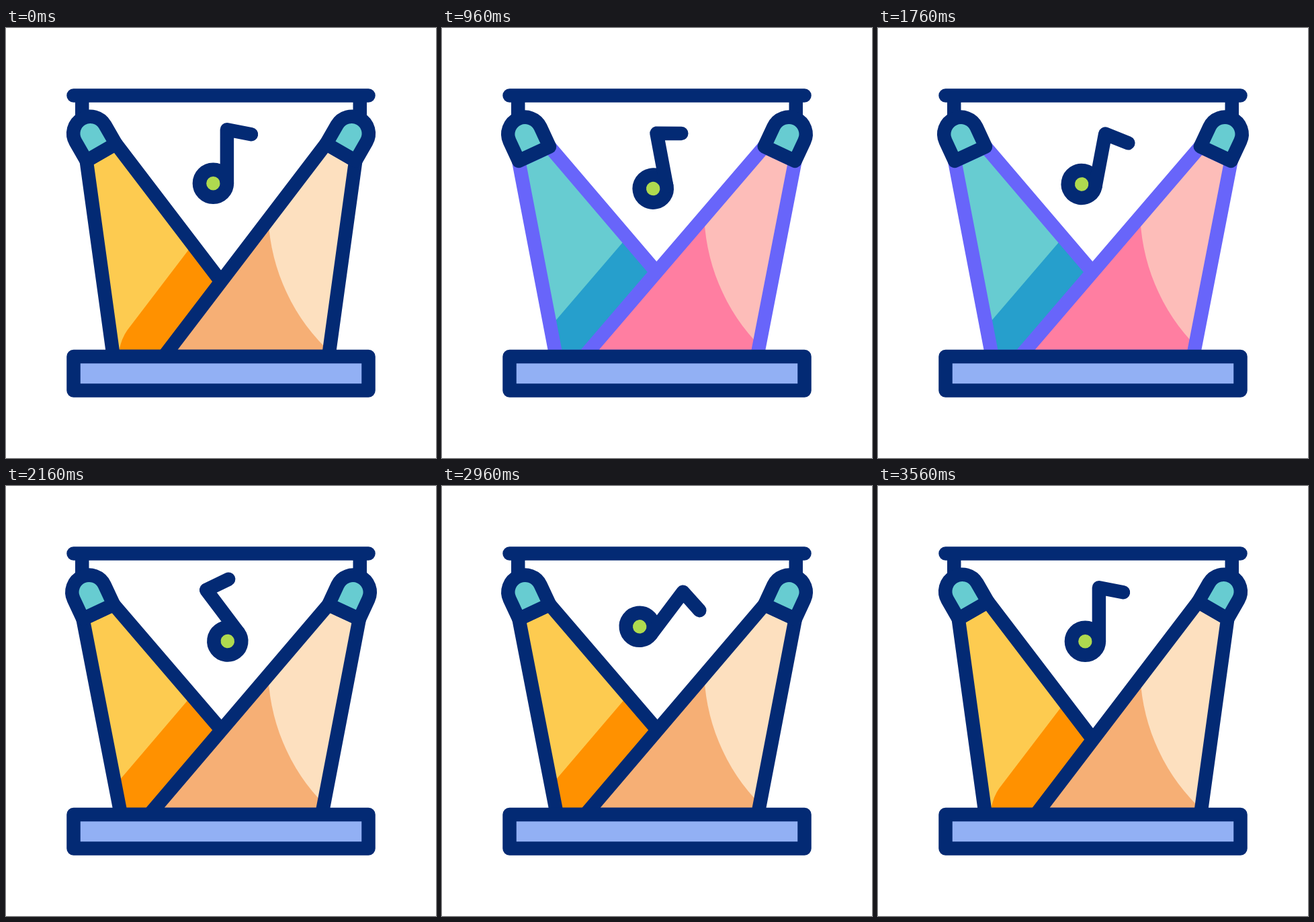
An HTML page with a canvas for the animation above (3.6 s loop, 640 px wide and 640 px high).

```html
<!DOCTYPE html>
<html lang="en">
<head>
<meta charset="utf-8">
<title>Stage lights</title>
<style>
  html, body { margin: 0; width: 100%; height: 100%; overflow: hidden; background: #fff; }
  canvas { display: block; }
</style>
</head>
<body>
<canvas id="stage" width="640" height="640"></canvas>
<script>
const ctx = document.getElementById('stage').getContext('2d');
const LOOP = 3600, END = 3560, STEP = 400, LINE = 20.5, FLOOR = 479;
const NAVY = '#032a74', TEAL = '#67ccd1';
const WARM = { line: NAVY, left: '#fdcb50', leftShade: '#ff9100', right: '#fde0bf', rightShade: '#f6af75' };
const COOL = { line: '#6865fa', left: TEAL, leftShade: '#269fcc', right: '#fdbdb9', rightShade: '#ff7ea1' };

const ease = u => u * u * (3 - 2 * u);
const mix = (a, b, u) => a + (b - a) * u;

// Eased value of a list of keys spaced STEP apart; the last one lands on END.
function track(keys, t) {
  if (t >= END) return keys[keys.length - 1];
  const i = Math.floor(t / STEP), start = i * STEP;
  const u = (t - start) / (Math.min(start + STEP, END) - start);
  return mix(keys[i], keys[i + 1], ease(u));
}

// Lamp pose: tilt in degrees and the x of both beam edges on the floor.
const REST = [30, 158.5, 397.5];
const swung = s => [25 + 20 * s, 168.5 + 71.6 * s + 7.9 * s * s, 419 + 128 * s - 33.8 * s * s];
const FIRST = 360, LAST = 3160;

function poseAt(t, side) {
  if (t < FIRST) return blend(REST, swung(-side), t / FIRST);
  if (t >= LAST) return blend(swung(side), REST, Math.min(1, (t - LAST) / (END - LAST)));
  const n = (t - FIRST) / STEP, i = Math.floor(n);
  const s = (i % 2 ? 1 : -1) * (1 - 2 * ease(n - i));
  return swung(s * side);
}
const blend = (a, b, u) => a.map((v, i) => mix(v, b[i], ease(u)));

// Beam edges as lines x(y), from the lamp's corners to the floor.
function beamOf([tilt, floorLeft, floorRight]) {
  const a = tilt * Math.PI / 180, sin = Math.sin(a), cos = Math.cos(a);
  const edge = (side, floorX) => {
    const x = 113.25 + 56.7 * sin + side * 25.3 * cos;
    const y = 135.8 + 56.7 * cos - side * 25.3 * sin;
    const slope = (floorX - x) / (FLOOR - y);
    return { x, y, slope, at: py => x + (py - y) * slope };
  };
  return { a, left: edge(-1, floorLeft), right: edge(1, floorRight) };
}

function drawBeam({ left, right }, fill, line, drawShade) {
  const shape = new Path2D();
  shape.moveTo(left.x, left.y);
  shape.lineTo(left.at(489), 489);
  shape.lineTo(right.at(489), 489);
  shape.lineTo(right.x, right.y);
  shape.closePath();
  ctx.fillStyle = fill;
  ctx.fill(shape);
  ctx.save();
  ctx.clip(shape);
  drawShade();
  ctx.restore();
  ctx.strokeStyle = line;
  ctx.stroke(shape);
}

// Shade on the left beam, running parallel to the front beam.
function drawBandShade(front, color) {
  const { right } = front;
  const offset = 67 * Math.hypot(1, right.slope);
  const x = y => 640 - right.at(y) - offset;
  const bend = x(450);
  ctx.fillStyle = color;
  ctx.beginPath();
  ctx.moveTo(x(100), 100);
  ctx.lineTo(bend, 450);
  ctx.quadraticCurveTo(bend - 8.5, 462, bend - 12, 480);
  ctx.lineTo(bend - 12, 500);
  ctx.lineTo(900, 500);
  ctx.lineTo(900, 100);
  ctx.fill();
}

function drawRoundLight(color) {
  ctx.fillStyle = color;
  ctx.beginPath();
  ctx.arc(-41, 270, 291, 0, 2 * Math.PI);
  ctx.fill();
}

function drawLamp(a) {
  ctx.save();
  ctx.translate(113.25, 135.8);
  ctx.rotate(-a);
  ctx.beginPath();
  ctx.moveTo(-25.3, 56.7);
  ctx.arc(0, 24.5, 25.3, Math.PI, 0);
  ctx.lineTo(25.3, 56.7);
  ctx.closePath();
  ctx.fillStyle = TEAL;
  ctx.fill();
  ctx.strokeStyle = NAVY;
  ctx.stroke();
  ctx.restore();
}

function mirrored(draw) {
  ctx.save();
  ctx.translate(640, 0);
  ctx.scale(-1, 1);
  draw();
  ctx.restore();
}

function drawNote(t) {
  const turn = track([0, -1, -1, 1, 1, -1, -1, 1, 1, 0], t) * 37 * Math.PI / 180;
  const lift = track([0, -1, 1, -1, 1, -1, 1, -1, 1, 0], t) * 17.6;
  ctx.save();
  ctx.translate(326.4, 201.6 + lift);
  ctx.rotate(turn);
  ctx.translate(-326.4, -201.6);
  ctx.fillStyle = '#afda4f';
  ctx.strokeStyle = NAVY;
  ctx.beginPath();
  ctx.arc(308.4, 231.2, 20.5, 0, 2 * Math.PI);
  ctx.fill();
  ctx.stroke();
  ctx.beginPath();
  ctx.moveTo(328.9, 231.2);
  ctx.lineTo(328.9, 151.2);
  ctx.lineTo(365, 158.3);
  ctx.stroke();
  ctx.restore();
}

function drawRig() {
  ctx.strokeStyle = NAVY;
  ctx.beginPath();
  ctx.moveTo(100.5, 100.5);
  ctx.lineTo(539.5, 100.5);
  for (const x of [113.25, 526.75]) {
    ctx.moveTo(x, 100.5);
    ctx.lineTo(x, 135);
  }
  ctx.stroke();
}

function drawFloor() {
  ctx.fillStyle = '#92b0f4';
  ctx.strokeStyle = NAVY;
  ctx.beginPath();
  ctx.rect(100.5, 489, 439, 50.5);
  ctx.fill();
  ctx.stroke();
}

// Every other swing from the third on is lit in the cool colours.
function colorsAt(t) {
  const swing = Math.floor((t + STEP - FIRST) / STEP);
  return swing >= 2 && swing <= 6 && swing % 2 === 0 ? COOL : WARM;
}

function draw(now) {
  const t = now % LOOP;
  const colors = colorsAt(t);
  const back = beamOf(poseAt(t, 1)), front = beamOf(poseAt(t, -1));
  ctx.clearRect(0, 0, 640, 640);
  ctx.lineWidth = LINE;
  ctx.lineCap = ctx.lineJoin = 'round';
  drawRig();
  drawBeam(back, colors.left, colors.line, () => drawBandShade(front, colors.leftShade));
  mirrored(() => drawBeam(front, colors.rightShade, colors.line, () => drawRoundLight(colors.right)));
  drawLamp(back.a);
  mirrored(() => drawLamp(front.a));
  drawFloor();
  drawNote(t);
  requestAnimationFrame(() => draw(performance.now()));
}
draw(0);
</script>
</body>
</html>
```
